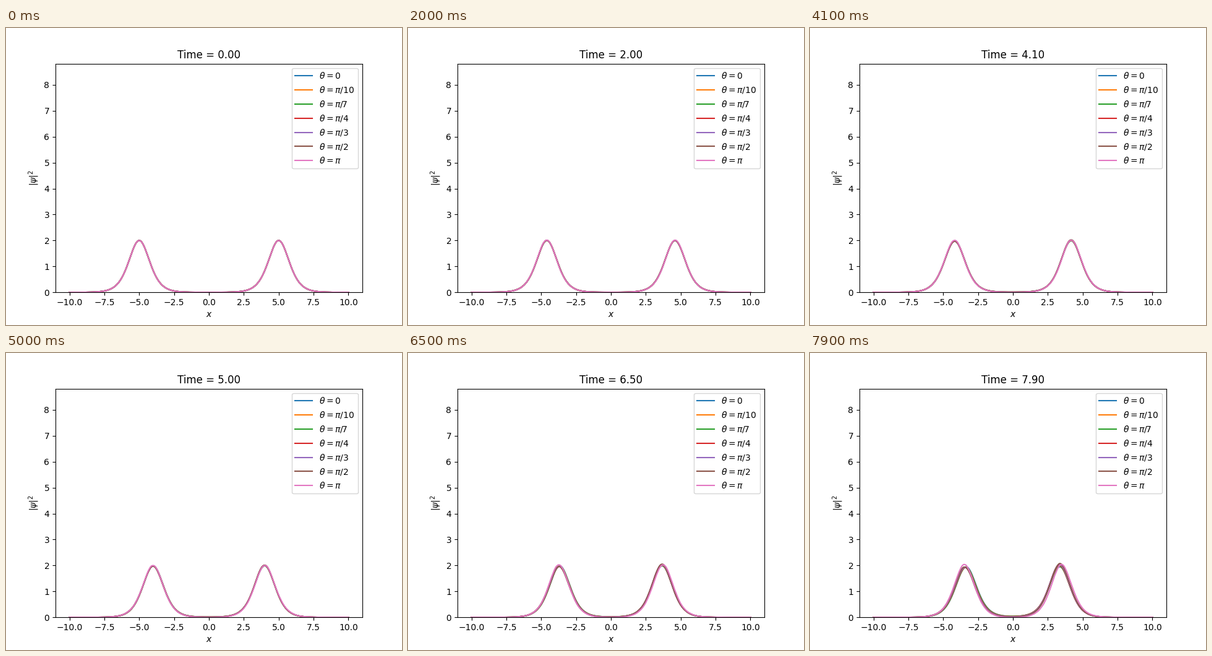
Recreate the animation shown at these times as a matplotlib script. Size 640 px wide and 480 px high, loop 8000 ms.

```python
import numpy as np
import matplotlib.pyplot as plt
from matplotlib.animation import FuncAnimation

# Two solitons of i u_t + u_xx + |u|^2 u = 0 meeting with relative phase theta
PHASES = [
    (0, "0"),
    (np.pi / 10, r"\pi/10"),
    (np.pi / 7, r"\pi/7"),
    (np.pi / 4, r"\pi/4"),
    (np.pi / 3, r"\pi/3"),
    (np.pi / 2, r"\pi/2"),
    (np.pi, r"\pi"),
]
FRAMES, STEP = 80, 0.1
SUBSTEPS = 20
SPEED, START = 0.2, 5.0

x = np.linspace(-10, 10, 512)
k = 2 * np.pi * np.fft.fftfreq(x.size, x[1] - x[0])


def soliton(x0, v):
    return np.sqrt(2) / np.cosh(x - x0) * np.exp(0.5j * v * (x - x0))


def solve():
    """Split-step Fourier densities, shape (frame, phase, x)."""
    theta = np.array([t for t, _ in PHASES])[:, None]
    u = soliton(-START, SPEED) + np.exp(1j * theta) * soliton(START, -SPEED)
    dt = STEP / SUBSTEPS
    half = np.exp(-0.5j * k**2 * dt)
    out = [np.abs(u) ** 2]
    for _ in range(FRAMES - 1):
        for _ in range(SUBSTEPS):
            u = np.fft.ifft(half * np.fft.fft(u))
            u = u * np.exp(1j * np.abs(u) ** 2 * dt)
            u = np.fft.ifft(half * np.fft.fft(u))
        out.append(np.abs(u) ** 2)
    return np.array(out)


density = solve()

fig, ax = plt.subplots(figsize=(6.4, 4.8), dpi=100)
lines = [
    ax.plot(x, rho, label=rf"$\theta={name}$")[0]
    for rho, (_, name) in zip(density[0], PHASES)
]
ax.set_ylim(0, 8.82)
ax.set_xlabel("$x$")
ax.set_ylabel(r"$|\psi|^2$")
ax.legend(loc="upper right")
title = ax.set_title("Time = 0.00")


def update(i):
    for line, rho in zip(lines, density[i]):
        line.set_ydata(rho)
    title.set_text(f"Time = {i * STEP:.2f}")
    return [*lines, title]


anim = FuncAnimation(fig, update, frames=FRAMES, interval=100,
                     repeat=True, repeat_delay=0, blit=False)
plt.show()
```
